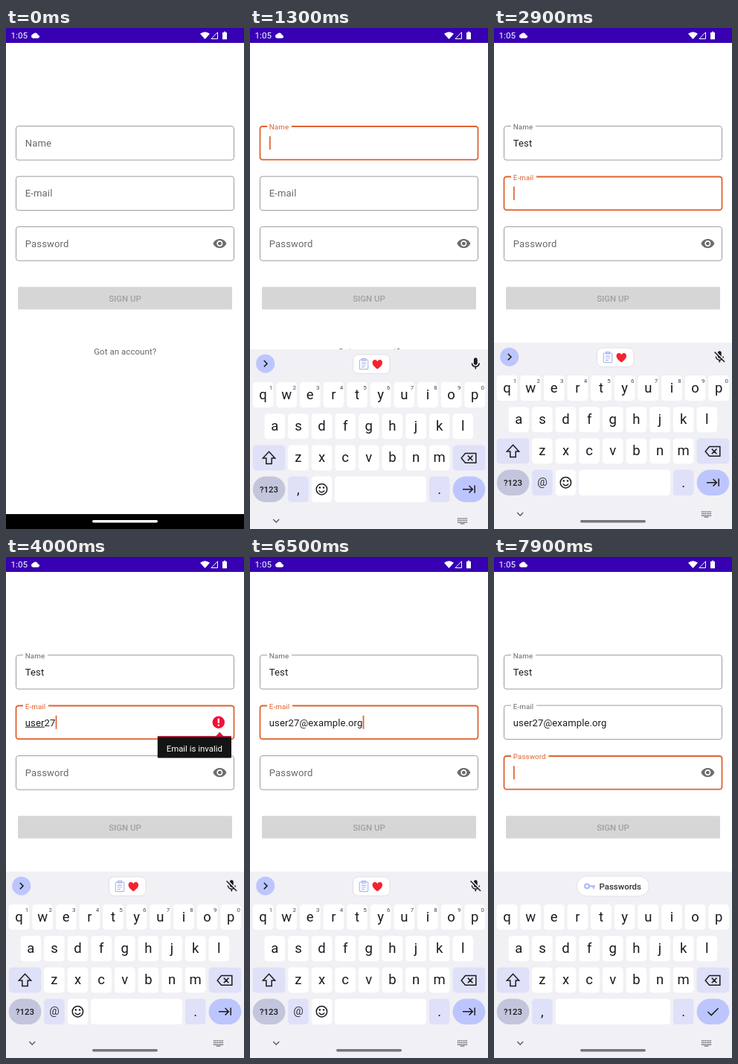
These frames come from a looping animation (320x672 px, 8000 ms). An HTML page:

```html
<!DOCTYPE html>
<html lang="en">
<head>
<meta charset="utf-8">
<title>Sign up form</title>
<style>
  html, body { margin: 0; width: 100%; height: 100%; overflow: hidden; background: #fff; }
  svg { display: block; width: 100vw; height: 100vh; font-family: Roboto, sans-serif; }
  text { white-space: pre; }
  .body { font-size: 13.05px; letter-spacing: .12px; }
  .mid { text-anchor: middle; }
  .small { font-size: 11.42px; }
  .medium { font-weight: 500; }
  .key { font-size: 18.5px; text-anchor: middle; fill: #1b1b1f; }
  .hint { font-size: 8px; text-anchor: middle; fill: #45464f; }
  .line { fill: none; stroke: #1b1b1f; stroke-width: 1.5; }
</style>
</head>
<body>
<svg id="stage" viewBox="0 0 320 672" preserveAspectRatio="none"></svg>
<script>
const LOOP = 8000;
const ACCENT = '#df622f', GREY = '#686868';
const KEY_TINT = '#dfe1f9', KEY_BLUE = '#bcc5fd';
const FOCUS_AT = [1050, 2600, 6900];
const KEYBOARD_AT = [1100, 2900, 7300];
const ERROR_FROM = 3100, ERROR_TO = 6200;

// One time per typed character
const TYPED = [
  { text: 'Test', times: [1900, 2000, 2000, 2100], underlineUntil: 2600 },
  { text: 'user27@example.org', underlineUntil: 4600,
    times: [3000, 3100, 3300, 3400, 3800, 4000, 4300, 4600, 5000,
            5300, 5400, 5600, 5700, 5900, 6100, 6200, 6300, 6500] },
  { text: '', times: [], underlineUntil: 0 }
];

const MIC = `<path d="M12 14c1.66 0 3-1.34 3-3V5c0-1.66-1.34-3-3-3S9 3.34 9 5v6c0 1.66 1.34 3 3 3z
  M17 11c0 2.76-2.24 5-5 5s-5-2.24-5-5H5c0 3.53 2.61 6.43 6 6.92V21h2v-3.08c3.39-.49 6-3.39 6-6.92z"/>`;
const MIC_OFF = `<path d="M19 11h-1.7c0 .74-.16 1.43-.43 2.05l1.23 1.23c.56-.98.9-2.09.9-3.28z
  M14.98 11.17c0-.06.02-.11.02-.17V5c0-1.66-1.34-3-3-3S9 3.34 9 5v.18z
  M4.27 3 3 4.27l6.01 6.01V11c0 1.66 1.33 3 2.99 3 .22 0 .44-.03.65-.08l1.66 1.66c-.71.33-1.5.52-2.31.52-2.76 0-5.3-2.1-5.3-5.1H5c0 3.41 2.72 6.23 6 6.72V21h2v-3.28c.91-.13 1.77-.45 2.54-.9L19.73 21 21 19.73z"/>`;

const box = (x, y, w, h, r, fill, extra = '') =>
  `<rect x="${x}" y="${y}" width="${w}" height="${h}" rx="${r}" fill="${fill}" ${extra}/>`;
const label = (x, y, str, cls, extra = '') =>
  `<text x="${x}" y="${y}" class="${cls}" ${extra}>${str}</text>`;
const path = (d, extra = 'class="line"') => `<path d="${d}" ${extra}/>`;
const fieldTop = i => 131.6 + 67.5 * i;

function statusBar() {
  return box(0, 0, 320, 20, 0, '#3700b3') +
    label(6.6, 14.2, '1:05', 'small', 'fill="#fff" style="font-size:11.6px"') +
    `<g fill="#fff">
      <path transform="translate(34 4.6) scale(.46)" d="M19.35 10.04C18.67 6.59 15.64 4 12 4 9.11 4 6.6 5.64 5.35 8.04 2.34 8.36 0 10.91 0 14c0 3.31 2.69 6 6 6h13c2.76 0 5-2.24 5-5 0-2.64-2.05-4.78-4.65-4.96z"/>
      <path d="M267.5 15 261 7.8Q267.5 2.6 274 7.8Z"/>
      <path d="M276 14.5H284.5V5.8Z" fill="none" stroke="#fff"/>
      <path d="M292.8 4.8h2.4v1.1h1.8v9.3h-6V5.9h1.8z"/>
    </g>`;
}

function field(name, i) {
  const y = fieldTop(i);
  return `<g id="field${i}">
    ${box(13.5, y, 293, 45.6, 3.3, '#fff', 'class="frame"')}
    ${box(23, y - 3, 0, 6, 0, '#fff', 'class="gap"')}
    ${label(0, 0, name, 'body label')}
    ${label(25.8, y + 27.5, '', 'body value', 'fill="#1c1c1c"')}
    ${box(26, y + 28.6, 0, 1, 0, '#222', 'class="underline"')}
    ${box(26, y + 13.6, 1.7, 18, 0, ACCENT, 'class="caret"')}
  </g>`;
}

function form() {
  const eye = `<path fill="#6c6c6c" transform="translate(277.6 279.3) scale(.816)" d="M12 4.5C7 4.5 2.73 7.61 1 12c1.73 4.39 6 7.5 11 7.5s9.27-3.11 11-7.5c-1.73-4.39-6-7.5-11-7.5zM12 17c-2.76 0-5-2.24-5-5s2.24-5 5-5 5 2.24 5 5-2.24 5-5 5zm0-8c-1.66 0-3 1.34-3 3s1.34 3 3 3 3-1.34 3-3-1.34-3-3-3z"/>`;
  const error = `<g id="error">
    <circle cx="285.8" cy="221.8" r="8.2" fill="#f30f38"/>
    ${box(284.6, 216.6, 2.4, 6.4, .5, '#fff')}${box(284.6, 224.4, 2.4, 2.4, .5, '#fff')}
    ${path('M281.5 241 287.3 234.8 293 241Z', 'fill="#f30f38"')}
    ${box(203.8, 240.5, 99.2, 29, 1, '#141414')}${box(203.8, 240.3, 99.2, 1.4, 0, '#c20d30')}
    ${label(253.3, 260.8, 'Email is invalid', 'small mid', 'fill="#fff"')}
  </g>`;
  return ['Name', 'E-mail', 'Password'].map(field).join('') + eye + error +
    box(16, 347.2, 288, 30.3, 1.6, '#d6d6d6') +
    label(160, 367, 'SIGN UP', 'small medium mid', 'fill="#a0a0a0"') +
    label(160.2, 437.8, 'Got an account?', 'small mid', 'fill="#666" letter-spacing=".1"');
}

function letterRow(letters, x, y, hints) {
  return [...letters].map((ch, i) => {
    const cx = x + 31.63 * i;
    return box(cx - 13.8, y, 27.6, 34, 4.5, '#fff') + label(cx, y + 22.8, ch, 'key') +
      (hints ? label(cx + 10.6, y + 9.6, (i + 1) % 10, 'hint typing') : '');
  }).join('');
}

function toolbar() {
  const mic = (mode, shape) =>
    `<g class="${mode}" fill="#1b1b1f" transform="translate(293.6 431.6) scale(.81)">${shape}</g>`;
  return `<g class="typing">
      <circle cx="20.7" cy="441.2" r="12.5" fill="${KEY_BLUE}"/>${path('M18.8 437 23 441.2 18.8 445.4')}
      ${box(138.5, 429, 49.5, 25.6, 7, '#fff', 'stroke="#dfdfe6"')}
      <g fill="none" stroke="#a9b6ee" stroke-width="1.1">
        <rect x="147.3" y="436" width="11.4" height="12.6" rx="1.2"/>
        <path d="M150.4 436.2v-1.6h5.2v2.6h-5.2zM149.8 440.4h6.4M149.8 443h6.4M149.8 445.6h4.2"/>
      </g>
      ${path('M171.3 448.6C166 444.6 164.6 442.4 164.6 439.8 164.6 435.4 169.8 434.8 171.3 438.4 172.8 434.8 178 435.4 178 439.8 178 442.4 176.6 444.6 171.3 448.6Z', 'fill="#f4232f"')}
    </g>
    ${mic('mode0', MIC)}${mic('mode1', MIC_OFF)}
    <g class="mode2">
      ${box(111.2, 428, 97, 27, 13.5, '#fff', 'stroke="#dfdfe6"')}
      <circle cx="125" cy="441.5" r="2.9" fill="none" stroke="#b3befa" stroke-width="2.3"/>
      ${path('M128.5 441.5H136M133.8 441.5V445', 'stroke="#b3befa" stroke-width="2.3"')}
      ${label(141.5, 445.7, 'Passwords', 'small medium', 'fill="#303036"')}
    </g>`;
}

function keyboard() {
  const dots = y => path(`M279 ${y}H292`, 'stroke="#55565c" stroke-width="1.3" stroke-dasharray="1.5 .8"');
  return `<g id="keyboard">
    ${box(0, 422, 320, 260, 0, '#f1f0f5')}
    ${toolbar()}
    ${letterRow('qwertyuiop', 17.5, 466, true)}
    ${letterRow('asdfghjkl', 33.3, 508.2)}
    ${letterRow('zxcvbnm', 64.9, 550.4)}
    ${box(3.7, 550.4, 43.7, 34, 4.5, KEY_TINT)}${box(272.6, 550.4, 43.7, 34, 4.5, KEY_TINT)}
    ${path('M25.5 559.3 33.6 568H29.2V575.6H21.8V568H17.4Z')}
    ${path('M284.2 567.9 289.5 561.6H303.8V574.2H289.5ZM292.8 564.6 299.4 571.2M299.4 564.6 292.8 571.2')}
    ${box(3.7, 592.6, 43.7, 34.4, 17.2, '#c3c5dc')}${label(25.5, 614, '?123', 'small medium mid', 'fill="#1b1b1f"')}
    ${box(51.1, 592.6, 27.6, 34.4, 4.5, KEY_TINT)}${box(240.9, 592.6, 27.6, 34.4, 4.5, KEY_TINT)}
    ${label(64.9, 615.6, ',', 'key mode0 mode2')}${label(64.9, 614.2, '@', 'key mode1', 'style="font-size:15px;fill:#303036"')}
    ${label(254.7, 615.6, '.', 'key')}
    <g class="typing">
      ${box(82.7, 592.6, 27.6, 34.4, 4.5, '#fff')}${box(114, 592.6, 123, 34.4, 4.5, '#fff')}
      <circle cx="96.4" cy="609.7" r="7.2" class="line"/>
      <circle cx="93.8" cy="607.4" r="1.2"/><circle cx="99" cy="607.4" r="1.2"/>
      ${path('M92.6 611.4Q96.4 616.2 100.2 611.4')}
    </g>
    ${box(82.7, 592.6, 154.3, 34.4, 4.5, '#fff', 'class="mode2"')}
    ${box(272.6, 592.6, 43.7, 34.4, 17.2, KEY_BLUE)}
    ${path('M286 609.7H299.2M294.6 605 299.4 609.7 294.6 614.4M302.2 604.6V614.8', 'class="line typing"')}
    ${path('M287.4 610 292.2 614.6 301.6 605.2', 'class="line mode2"')}
    ${path('M31.2 650 35.2 654 39.2 650', 'fill="none" stroke="#55565c" stroke-width="1.3"')}
    ${dots(648.8)}${dots(651.4)}${dots(654)}${path('M282.5 656H288.5', 'stroke="#55565c"')}
    ${box(116, 660, 88, 3.4, 1.7, '#77777b', 'id="handle"')}
  </g>`;
}

const stage = document.getElementById('stage');
stage.innerHTML = box(0, 0, 320, 672, 0, '#fff') + form() + statusBar() +
  box(0, 652, 320, 20, 0, '#000') + box(116, 660, 88, 3.4, 1.7, '#fff') + keyboard();

const find = sel => stage.querySelector(sel);
const fields = FOCUS_AT.map((_, i) => {
  const parts = {};
  for (const name of ['frame', 'gap', 'label', 'value', 'underline', 'caret'])
    parts[name] = find(`#field${i} .${name}`);
  parts.labelWidth = parts.label.getComputedTextLength();
  return parts;
});
const modal = [...stage.querySelectorAll('.mode0, .mode1, .mode2, .typing')];
const [keyboardEl, handle, error] = ['#keyboard', '#handle', '#error'].map(find);

const progress = (t, from, length) => Math.min(1, Math.max(0, (t - from) / length));
const smooth = p => p * p * (3 - 2 * p);
const show = (el, on) => el.setAttribute('visibility', on ? 'visible' : 'hidden');
const stageAt = (t, starts) => starts.filter(s => t >= s).length - 1;

function set(el, attrs) {
  for (const key in attrs) el.setAttribute(key, attrs[key]);
}

function drawField(f, i, t, focused) {
  const { text, times, underlineUntil } = TYPED[i];
  const rise = smooth(progress(t, FOCUS_AT[i], 167));
  const scale = 1 - .25 * rise;
  const y = fieldTop(i) + 27 - 22.6 * rise;
  // The thicker focus stroke grows inwards
  const inset = focused ? .4 : 0;
  set(f.frame, {
    y: fieldTop(i) + inset, height: 45.5 - 2 * inset,
    stroke: focused ? ACCENT : '#9c9c9c', 'stroke-width': focused ? 1.8 : 1
  });
  set(f.label, { transform: `translate(25.8 ${y}) scale(${scale})`, fill: focused ? ACCENT : GREY });
  set(f.gap, { width: rise > .3 ? (f.labelWidth * .75 + 6.5) * rise : 0 });

  const count = times.filter(at => t >= at).length;
  f.value.textContent = text.slice(0, count);
  const end = count ? f.value.getComputedTextLength() : 0;
  const composed = Math.min(count, 4);
  const marked = composed && t < underlineUntil ? f.value.getSubStringLength(0, composed) : 0;
  set(f.underline, { width: marked });

  const lastChange = count ? times[count - 1] : FOCUS_AT[i];
  set(f.caret, { x: 26 + end });
  show(f.caret, focused && Math.floor((t - lastChange) / 500) % 2 === 0);
}

function draw(t) {
  const focus = stageAt(t, FOCUS_AT);
  fields.forEach((f, i) => drawField(f, i, t, i === focus));
  show(error, t >= ERROR_FROM && t < ERROR_TO);

  const mode = Math.max(0, stageAt(t, KEYBOARD_AT));
  for (const el of modal) {
    const has = name => el.classList.contains(name);
    el.style.display = has('mode' + mode) || (has('typing') && mode < 2) ? '' : 'none';
  }
  const hidden = (1 - progress(t, KEYBOARD_AT[0], 300)) ** 3;
  set(keyboardEl, { transform: `translate(0 ${250 * hidden})` });
  set(handle, { opacity: progress(t, 1450, 250) });
}

const start = performance.now();
function tick() {
  draw((performance.now() - start) % LOOP);
  requestAnimationFrame(tick);
}
tick();
</script>
</body>
</html>
```
